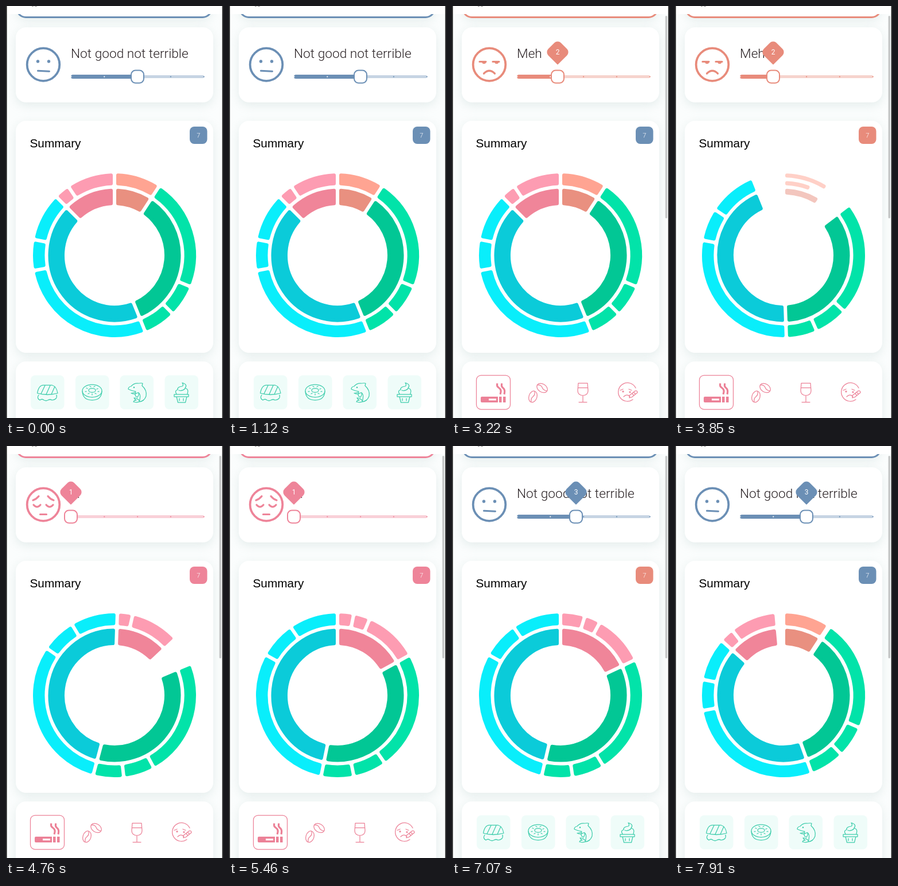
Animation of 378x714 px, one loop 8 s. Source, as an HTML page:

```html
<!DOCTYPE html>
<html lang="en">
<head>
<meta charset="utf-8">
<title>Mood summary</title>
<style>
  html, body { margin: 0; width: 100%; height: 100%; overflow: hidden; background: #fff; }
  svg { display: block; position: absolute; left: 0; top: 0; --c: #6b8fb5; }
  text { font-family: Roboto, "Liberation Sans", sans-serif; }
  .line { fill: none; stroke: var(--c); stroke-linecap: round; stroke-linejoin: round; }
  .fill { fill: var(--c); }
  .card { fill: #fff; filter: drop-shadow(0 5px 9px rgba(185, 205, 202, .34)); }
  .icons { fill: none; stroke-width: 1.25; stroke-linecap: round; stroke-linejoin: round; }
  .tile { fill: #effcf9; stroke: none; }
  #good { stroke: #3fcdac; }
  #bad { stroke: #ec8197; }
  .solid { fill: #ec8197; stroke: none; }
</style>
</head>
<body>
<svg width="378" height="714" viewBox="0 0 378 714">
  <rect width="378" height="714" fill="#fbfdfd"/>
  <rect x="18.500" y="-60" width="340" height="79.500" rx="16" fill="#fff" class="card"/>
  <rect x="18.500" y="-60" width="340" height="79.500" rx="16" class="line" stroke-width="3"/>
  <rect width="378" height="14" fill="#fff"/>
  <path d="M45 .5h3M50 .5h4" stroke="#999"/>
  <rect x="17" y="37" width="344" height="130" rx="18" class="card"/>
  <rect x="17" y="199" width="344" height="402" rx="18" class="card"/>
  <rect x="17" y="616" width="344" height="140" rx="18" class="card"/>

  <circle cx="65" cy="101.500" r="28.300" class="line" stroke-width="3.800"/>
  <g id="face3">
    <circle cx="55.500" cy="96" r="2.700" class="fill"/>
    <circle cx="74.500" cy="96" r="2.700" class="fill"/>
    <path d="M55.500 112.200L75.500 113.200" class="line" stroke-width="3"/>
  </g>
  <g id="face2">
    <path d="M48 96.500H59M71 96.500H82M55.500 117Q65 107.500 74.500 117" class="line" stroke-width="3.200"/>
    <path d="M52 97h7.500a3.800 3.800 0 0 1-7.500 0zM74 97h7.500a3.800 3.800 0 0 1-7.500 0z" class="fill"/>
  </g>
  <g id="face1">
    <path d="M47 94Q53 92 57 87M83 94Q77 92 73 87M48 102Q54 109 60 102M70 102Q76 109 82 102M59.500 118.500H70.500" class="line" stroke-width="3.200"/>
  </g>

  <text id="mood" x="113" y="89.500" font-size="22.700" font-weight="300" fill="#2b2326"></text>
  <rect x="113" y="120" width="232" height="5" rx="2.500" class="fill" opacity=".38"/>
  <rect id="track" x="113" y="119" height="7" rx="3.500" class="fill"/>
  <g id="marks"></g>
  <g id="thumb">
    <rect x="-11" y="111.500" width="22" height="22" rx="7.500" fill="#fff" class="knob" stroke="var(--c)" stroke-width="2"/>
    <g id="tip">
      <path class="fill" transform="translate(0 80) rotate(45)" d="M-7.500 -15.500H7.500a8 8 0 0 1 8 8V14a1.500 1.500 0 0 1 -1.500 1.500H-7.500a8 8 0 0 1 -8 -8V-7.500a8 8 0 0 1 8 -8z"/>
      <text id="value" y="84" font-size="12" fill="#fff" text-anchor="middle"></text>
    </g>
  </g>

  <rect id="badge" x="320" y="209" width="30.500" height="30" rx="8"/>
  <text x="335.300" y="227.500" font-size="11" font-weight="300" fill="#fff" text-anchor="middle">7</text>
  <text x="41.500" y="245" font-size="20.800" fill="#000" style="font-family:'Liberation Sans',sans-serif">Summary</text>
  <g id="chart" transform="translate(189 432)"></g>

  <g id="good" class="icons">
    <g class="tile">
      <rect x="43" y="640" width="58.500" height="59" rx="8"/>
      <rect x="121" y="640" width="58.500" height="59" rx="8"/>
      <rect x="198.500" y="640" width="58.500" height="59" rx="8"/>
      <rect x="276.500" y="640" width="58.500" height="59" rx="8"/>
    </g>
    <path d="M54.500 671Q57 657 65 657H80Q88 659 90 671Q72 676 54.500 671zM61 672L68 657.500M70 673L77 657.500M79 673L85 659.500M57 674q-4 6 2 9q4-3 7 0q4 2 7 0q4-2 7 0q10-1 8-9"/>
    <ellipse cx="150" cy="667" rx="17" ry="11"/>
    <ellipse cx="150" cy="666" rx="6" ry="3.500"/>
    <path d="M133 668q1 15 17 15t17-15M140 662l2 1M146 659l2 1M155 659l-2 1M160 663l-2 1M138 668h2M143 672l2-1M150 674v-2M157 672l-2-1M162 668h-2"/>
    <path d="M213 664q0-4 5-5q5-6 13-5q5-1 7 0l-1 4q9 8 7 18q-3 9-12 10q4-14-2-16q-6 4-12 1q8-1 8-3q-7-1-13-4zM226 670q-3 6 3 8q3-4 2-8M233 685q-4-6-10-6q1 3 4 4q-4 0-5 3q7 2 11-1z"/>
    <circle cx="223" cy="661" r=".7"/>
    <path d="M293 673h25v4h-3l-2.500 10h-13l-2.500-10h-4zM298 677h16M302 680v4M309 680v4M297 672q-4-5 2-7q-1-5 8-6q3-2 0-6q10 3 5 9q7 2 4 10M301 666q6 2 11-3"/>
  </g>

  <g id="bad" class="icons">
    <rect x="42.500" y="640" width="59" height="59" rx="8"/>
    <path class="solid" d="M52 677h28v10h-28a2 2 0 0 1-2-2v-6a2 2 0 0 1 2-2zM82 677h4.500v10h-4.500zM89 677h4.500v10h-4.500z"/>
    <path d="M64 682h13" stroke="#fff" stroke-width="3" stroke-linecap="butt"/>
    <path d="M79 654q-2 5 3 8t2 11M87 654q-2 5 2 8t2 11" stroke-width="3.200" stroke-linecap="butt"/>
    <ellipse cx="141" cy="677" rx="7" ry="10" transform="rotate(18 141 677)"/>
    <path d="M144 668q1 6-3 9t-3 9"/>
    <ellipse cx="157" cy="662" rx="10" ry="7" transform="rotate(32 157 662)"/>
    <path d="M149 657q6-1 8 4t8 6"/>
    <path d="M220 653.500h16l1 13q0 8-9 8.500q-9-.5-9-8.500zM219.500 661.500h17M228 675v11M221 686.500h14"/>
    <path d="M320 662A16 16 0 1 0 315 682M293 666l5-2M308 664l5 2M299 677q6-6 11 0M309 675l10-8q4-1 4 3l-10 8l-4 1zM314 672l2 2M317 670l2 2"/>
    <circle cx="298" cy="668" r="1"/>
    <circle cx="310" cy="669" r="1"/>
  </g>

  <rect id="scroll" x="371.500" y="17" width="3.500" height="351" rx="1.700" fill="#c6c8c8"/>
  <rect width="1.500" height="714" fill="#111"/>
  <rect x="376.700" width="1.300" height="714" fill="#111"/>
</svg>
<script>
const LOOP = 8000, STEP = 70, GAP = 3;
const $ = id => document.getElementById(id);
const svg = document.querySelector('svg');

const moods = {
  1: { color: '#ee8499', text: '...' },
  2: { color: '#e88b7b', text: 'Meh' },
  3: { color: '#6b8fb5', text: 'Not good not terrible' }
};
const tones = {
  green: ['#02c795', '#02e3a9'],
  cyan: ['#0bcbd9', '#09eefb'],
  pink: ['#f08599', '#fd9cb2'],
  salmon: ['#e99080', '#ffa492']
};

// Angles in degrees, clockwise from the top: group start, then the end of each part.
const poses = {
  three: { salmon: [1], green: [33, 112.3, 135, 158], cyan: [158, 259.3, 281, 315], pink: [-45, -45, -34, 0] },
  swap: { salmon: [.35], green: [52.6, 132.6, 156.2, 178], cyan: [178, 280.5, 303.5, 338], pink: [0, 0, 0, 0] },
  two: { salmon: [0], green: [64.7, 148.7, 171.5, 193.2], cyan: [193.2, 299.3, 325.4, 360], pink: [0, 17.2, 28.5, 64.7] },
  turn: { salmon: [0], green: [67.5, 151.4, 173.5, 195], cyan: [195, 304.6, 328.9, 362], pink: [2, 2, 12.8, 47.3] },
  one: { salmon: [0], green: [61, 145, 168.5, 191.5], cyan: [191.5, 299.3, 325.4, 360], pink: [0, 11.4, 23, 61] },
  settle: { salmon: [1], green: [34.2, 113, 135.5, 160], cyan: [160, 259.3, 281, 311.3], pink: [-48.7, -48.7, -38.4, -5.2] }
};
const chartKeys = [
  [0, 'three'], [3780, 'three'], [3850, 'swap'], [3920, 'swap'], [4060, 'two'], [4480, 'two'],
  [4760, 'turn'], [4900, 'one'], [6440, 'one'], [6720, 'two'], [7630, 'two'], [7700, 'swap'],
  [7910, 'settle'], [LOOP, 'settle']
];
const moodKeys = [[0, 3], [3220, 2], [4480, 1], [6440, 2], [7070, 3]];
const badgeKeys = [[0, 3], [3850, 2], [4690, 1], [6720, 2], [7700, 3]];
const thumbKeys = [[0, 229], [3220, 184], [3290, 171], [4480, 126], [4550, 113], [6440, 171], [7070, 216], [7140, 229]];
const TOUCH = 2240;

const held = (keys, t) => keys.filter(k => k[0] <= t).pop()[1];
const mix = (a, b, f) => a + (b - a) * f;

function poseAt(t) {
  const i = Math.max(1, chartKeys.findIndex(k => k[0] > t));
  const [t0, a] = chartKeys[i - 1], [t1, b] = chartKeys[i];
  const f = (t - t0) / (t1 - t0), pose = {};
  for (const name in tones) {
    pose[name] = poses[a][name].map((v, n) => mix(v, poses[b][name][n], f));
  }
  return pose;
}

// Ring piece with parallel gaps and round corners.
function piece(r0, r1, from, to, color, alpha = 1) {
  const c = Math.max(.5, Math.min(3, (r1 - r0) / 2 - .5));
  const rad = Math.PI / 180, inset = GAP + c;
  const lo = r0 + c, hi = r1 - c;
  const ends = r => [from * rad + Math.asin(inset / r), to * rad - Math.asin(inset / r)];
  const [h0, h1] = ends(hi), [l0, l1] = ends(lo);
  if (h1 <= h0 || l1 <= l0) return '';
  const at = (r, a) => `${(r * Math.sin(a)).toFixed(2)} ${(-r * Math.cos(a)).toFixed(2)}`;
  const big = h1 - h0 > Math.PI ? 1 : 0;
  return `<path d="M${at(hi, h0)}A${hi} ${hi} 0 ${big} 1 ${at(hi, h1)}L${at(lo, l1)}` +
    `A${lo} ${lo} 0 ${big} 0 ${at(lo, l0)}Z" fill="${color}" stroke="${color}" ` +
    `stroke-width="${2 * c}" stroke-linejoin="round" opacity="${alpha}"/>`;
}

function drawChart(pose) {
  let out = '';
  for (const name of ['green', 'cyan', 'pink']) {
    const [inner, outer] = tones[name], a = pose[name];
    out += piece(87, 115.5, a[0], a[3], inner);
    for (let i = 0; i < 3; i++) out += piece(121.5, 142, a[i], a[i + 1], outer);
  }
  const q = pose.salmon[0];
  if (q > .05) {
    const [inner, outer] = tones.salmon, alpha = q ** .65;
    out += piece(115.5 - 28.5 * q, 115.5, 0, 33, inner, alpha);
    out += piece(142 - 20.5 * q, 142, 0, 33, outer, alpha);
    if (q < .6) out += piece(121.5, 121.5 + 20.5 * q, 0, 22.5, outer, alpha);
  }
  $('chart').innerHTML = out;
}

const show = (id, on) => { $(id).style.display = on ? '' : 'none'; };

function draw(t) {
  const mood = held(moodKeys, t), x = held(thumbKeys, t), touched = t >= TOUCH;
  svg.style.setProperty('--c', moods[mood].color);
  for (const n in moods) show('face' + n, n == mood);
  $('mood').textContent = moods[mood].text;
  $('value').textContent = mood;
  $('thumb').setAttribute('transform', `translate(${x} 0)`);
  $('track').setAttribute('width', x - 113);
  $('marks').innerHTML = [0, 1, 2, 3, 4].map(i => {
    const mx = 113.5 + i * 57.8;
    return `<circle cx="${mx}" cy="122.500" r="1.100" fill="${mx < x ? '#fff' : 'var(--c)'}"/>`;
  }).join('');
  $('badge').setAttribute('fill', moods[held(badgeKeys, t)].color);
  show('tip', touched);
  show('scroll', touched);
  show('good', mood === 3);
  show('bad', mood !== 3);
  drawChart(poseAt(t));
}

const start = performance.now();
let last = -1;
function tick() {
  const t = Math.floor((performance.now() - start) % LOOP / STEP) * STEP;
  if (t !== last) draw(last = t);
  requestAnimationFrame(tick);
}
tick();
</script>
</body>
</html>
```
